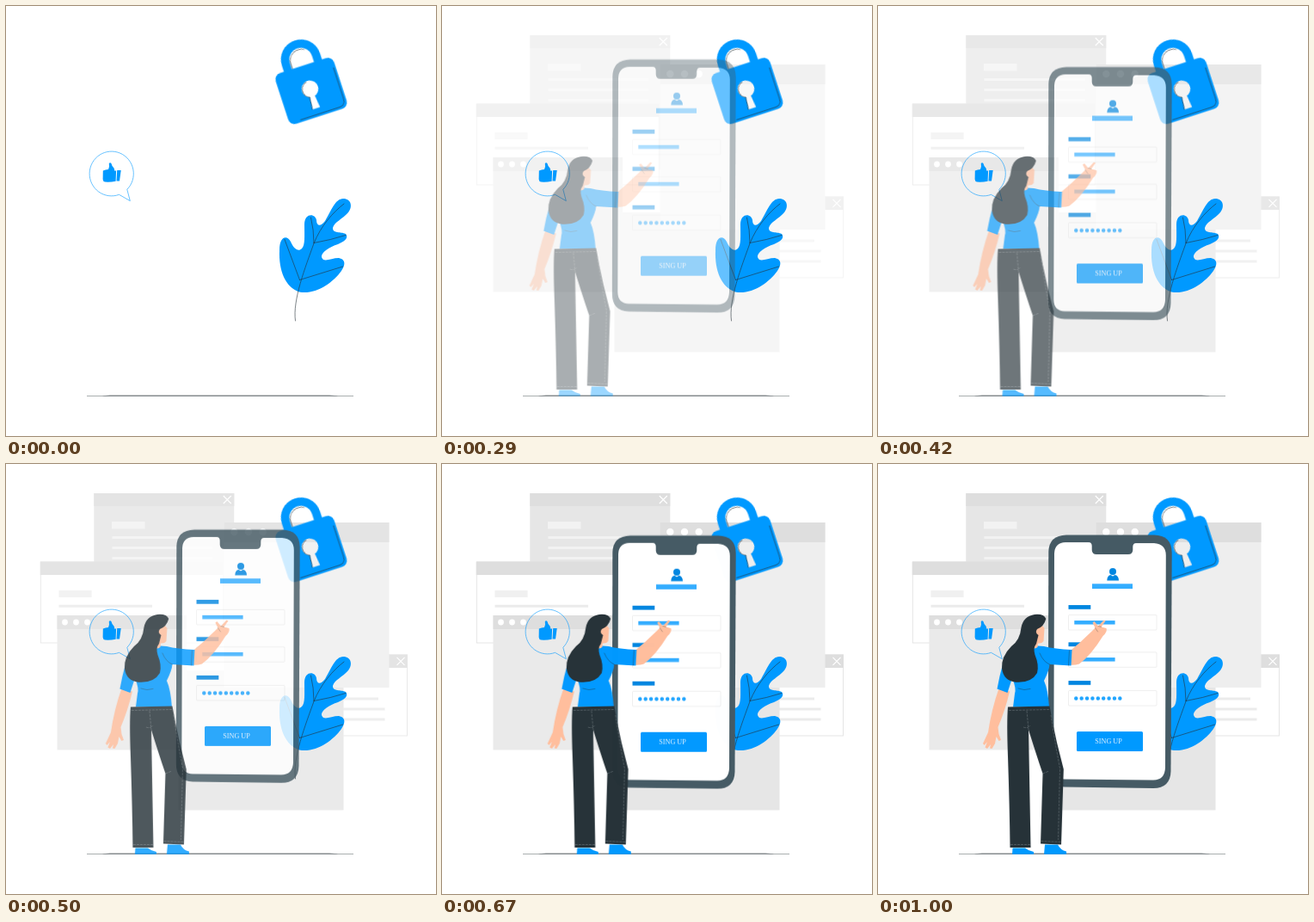
An HTML page for the animation above (1040 ms loop, 500x500 px).

```html
<!DOCTYPE html>
<html lang="en">
<head>
<meta charset="utf-8">
<title>Sign up</title>
<style>
  html, body { margin: 0; width: 100%; height: 100%; overflow: hidden; background: #fff; }
  svg { display: block; width: 100vw; height: 100vh; }

  .fade { animation: fade 1040ms infinite; }
  .phone { animation: fade 1040ms infinite, drop 1040ms infinite; }
  .woman { animation: fade 1040ms infinite, enter 1040ms infinite; }

  @keyframes fade {
    0% { opacity: 0; animation-timing-function: cubic-bezier(.37, .08, .63, .96); }
    67%, 100% { opacity: 1; }
  }
  @keyframes drop {
    0% { transform: translateY(-30px); animation-timing-function: cubic-bezier(.48, 0, .52, 1); }
    77% { transform: translateY(0); animation-timing-function: cubic-bezier(.45, 0, .8, .8); }
    100% { transform: translateY(-2.5px); }
  }
  @keyframes enter {
    0% { transform: translateX(-30px); animation-timing-function: cubic-bezier(.48, 0, .52, 1); }
    77% { transform: translateX(0); animation-timing-function: cubic-bezier(.45, 0, .8, .8); }
    100% { transform: translateX(-2.5px); }
  }

  .blue { fill: #09f; }
  .deep { fill: #0086e0; }
  .sky { fill: #33adff; }
  .dark { fill: #263238; }
  .skin { fill: #ffbe9d; }
  .white { fill: #fff; }
  .head { fill: #dedede; }
  .body { fill: #e6e6e6; }
  .pale { fill: #f2f2f2; }
  .ink { fill: none; stroke: #263238; stroke-width: .6; stroke-linecap: round; }
  .seam { fill: none; stroke: #8a9398; stroke-width: .4; }
  .cross { fill: none; stroke: #fff; stroke-width: 1.2; }
  .edge { fill: #fff; stroke: #e2e2e2; stroke-width: .9; }
  .field { fill: #fff; stroke: #e4e4e4; stroke-width: .6; }
  .dots { fill: none; stroke-linecap: round; }
  text { font: 8.2px "Liberation Serif", serif; fill: #e6f4ff; }
</style>
</head>
<body>
<svg viewBox="0 0 500 500">
  <defs>
    <g id="row">
      <rect class="deep" x="221.5" y="166" width="25.8" height="4.8"/>
      <rect class="field" x="221.5" y="177.5" width="102.5" height="17.5" rx="1"/>
    </g>
    <path id="x" class="cross" d="M-4.5-4.5 4.5 4.5M4.5-4.5-4.5 4.5"/>
  </defs>

  <!-- background windows -->
  <g class="fade">
    <rect class="edge" x="330" y="222" width="136.5" height="94"/>
    <path class="head" d="M330 221.5h137V237H330z"/>
    <use href="#x" x="459" y="229.3"/>
    <path fill="#ebebeb" d="M380 271.5h53v3h-53zM380 283.5h60.5v3h-60.5zM380 295.5h60.5v3h-60.5z"/>

    <path class="body" d="M200.5 240H392.5V402.5H200.5z"/>

    <path class="body" d="M102.3 34H265.3V190H102.3z"/>
    <path class="head" d="M102.3 34H265.3V49H102.3z"/>
    <use href="#x" x="257.3" y="41.5"/>
    <path class="pale" d="M123 67h38.5v8.5H123zM123.5 84h117v3h-117zM123.5 96h117v3h-117zM123.5 108h117v3h-117z"/>

    <path fill="#eee" d="M253.5 68H445.5V260H253.5z"/>
    <path class="head" d="M253.5 68H445.5V91H253.5z"/>
    <path class="dots" stroke="#fff" stroke-width="8.4" d="M265.3 79h0M282 79h0M298.7 79h0"/>

    <rect class="edge" x="40.3" y="114" width="212" height="94"/>
    <path class="head" d="M39.8 113.5H252.8V129H39.8z"/>
    <path fill="#f0f0f0" d="M61.5 147h38v8h-38z"/>
    <path fill="#ebebeb" d="M61.5 163.8h108.5v3H61.5z"/>

    <path fill="#eaeaea" d="M59.5 176H210V332.5H59.5z"/>
    <path class="head" d="M59.5 176H210V192H59.5z"/>
    <path class="dots" stroke="#fff" stroke-width="6.8" d="M68.5 184h0M81.5 184h0M94.5 184h0"/>
  </g>

  <!-- ground -->
  <path d="M94 453.5H404" stroke="#70777a" stroke-width=".6"/>
  <path fill="#858b8e" d="M112 454q3-1.5 9-1.5H376q7 0 10 1.5z"/>

  <!-- speech bubble -->
  <path fill="none" stroke="#09f" stroke-width=".6" d="M140.8 213.3A25.6 25.9 0 1 0 131.5 219.300L144.300 226.600Z"/>
  <path class="blue" d="M112.800 191.500q3-1.500 6.200-1.500 1.500-3.500.8-7 1.300-1.500 2.600 0 .6 3 3.100 5.500.8 1.500.6 3h2l-.5 12.300q-6 1.200-12.500.8-2.300-.5-2.500-3zM129.200 191h4.500l-1.700 12.500h-3.500z"/>

  <!-- padlock -->
  <g transform="translate(354.700 98.300) rotate(-18)">
    <path class="blue" d="M-23.300-26V-38A23.300 23.300 0 0 1 23.300-38V-26H13.500V-38A13.500 13.500 0 0 0-13.500-38V-26Z"/>
    <path class="ink" d="M-12.700-30.500V-38A13 13 0 0 1 7-48"/>
    <path class="blue" fill-rule="evenodd" d="M-28-30.500H28a7.700 7.700 0 0 1 7.700 7.700V23.800a7.700 7.700 0 0 1-7.700 7.700H-28a7.700 7.700 0 0 1-7.700-7.700V-22.800a7.700 7.700 0 0 1 7.700-7.700ZM-3.600 7-5 21.500H4L2.400 7A9.700 9.700 0 1 0-3.600 7Z"/>
    <path class="ink" d="M33-17V21q0 7.700-8 7.700H-22M-3.900 7-5.200 21.300M-4.100 7A9.700 9.700 0 0 1-2.600-11"/>
  </g>

  <!-- leaf -->
  <path class="blue" d="M341 332.5C325 327 317 308 318 284C318 267 327 266 331 274C335 283 340 286 344 282C348 278 347 268 347 254C347 240 360 241 361 249C361 256 366 257 371 250C378 238 383 224 392 224C402 224 403 234 398 240C391 248 382 251 380 258C380 265 389 262 395 265C399 270 393 274 386 277C376 280 366 287 367 292C369 299 378 293 387 293C396 295 394 302 390 308C380 322 360 336 341 332.5Z"/>
  <path class="ink" d="M336.5 366C333 342 348 304 358 276C366 256 380 240 393 230M341.5 318.5 324 271.5M341.5 318.5 391.5 303M358 275.5Q358 260 354.5 246M358 275.5Q378 272 395 266.5"/>

  <!-- phone -->
  <g class="phone">
    <path fill="#455a64" d="M219 84.5H321Q341.500 85 341.700 105L340.500 359Q340 379 320 379L217 377.500Q198 377 197.800 357L198.300 104Q198.800 85 219 84.500Z"/>
    <path class="white" d="M218 93H245Q248.500 93 248.700 97V102Q249 107 254 107H291Q296 107 296.300 102V98Q296.500 94 300 94H321Q334.800 95 334.800 108L334 355Q333.500 369.500 320 369.500L217 368.500Q204.500 368 204.300 355L205 106Q205.500 93.500 218 93Z"/>
    <circle class="deep" cx="273" cy="127" r="4"/>
    <path class="deep" d="M266.300 137.500Q266.500 131.500 270.500 131L273 132.500 275.500 131Q279.800 131.500 280 137.500Z"/>
    <path class="sky" d="M249 141.300h47v5.800h-47z"/>
    <use href="#row"/>
    <use href="#row" y="43.300"/>
    <use href="#row" y="88"/>
    <path class="sky" d="M228.300 184h47.300v4.500h-47.300zM228.300 227h47.300v4.500h-47.300z"/>
    <path class="dots" stroke="#1fa5ff" stroke-width="4.500" stroke-dasharray="0 6.380" d="M230.300 274.500H282"/>
    <rect class="blue" x="231" y="313" width="77" height="23" rx="1.500"/>
    <text x="268" y="327.300" text-anchor="middle">SING UP</text>
  </g>

  <!-- woman -->
  <g class="woman">
    <path class="blue" d="M158.500 446.500H173Q177 450 183 451V453.700H158ZM196 442.500H211Q214 449 221 450.500V453.700H195Z"/>
    <path class="skin" d="M142.500 261 155 264.500Q150 286 141.500 306L142.500 314 145 321 142.500 322 139.500 317 138 325 134.500 331 132 330.500 133 326 129 331 126.500 329.500 129 323 125.500 327 124 325 130 312Q134 285 142.500 261Z"/>
    <path class="skin" d="M225 217.500Q238 207 250 195L254.500 190.500 251.500 184.500 253.500 183 258 188.500 264.500 181.500 266.500 182.500 261.500 189.500 267.500 191Q269 195 263.500 200Q250 222 236 232.500 230 234.500 224 233.500Z"/>
    <path class="ink" stroke-opacity=".5" d="M254.500 190.500 257.500 195M261.500 189.500 258 188.500"/>
    <path class="blue" d="M147 233Q143 247 140.500 261.500L152.500 266 158 249Q163 261 161 267L159 282.500H201Q199.500 262 195 252Q201 240 201.500 233L226.500 234.500 227.500 216Q207 215 195 212L181 211Z"/>
    <path class="ink" stroke-opacity=".65" d="M201.500 233Q194 230 190 220M165 261Q172 264 179 261.500M158 249 161 240M224.500 217 223.500 234"/>
    <path class="skin" d="M181 187Q191 184 195.500 191L194.500 206Q192.500 209 188 208.500L187.500 213Q183 216 179 213Z"/>
    <path class="dark" d="M197.300 180Q195 174 184 175Q171 177 168.500 190Q167 205 157 212Q145 224 146 238Q148 252 162 253.700Q180 255 187 243Q189.500 234 184.500 222Q182 214 186 209L188.500 199Q184 196 187 192Q195 189 197.300 180Z"/>
    <path class="dark" d="M153 282.500 201.500 281.500Q205 302 210 324L217.800 355 215 442.500 191 441.500 193.500 360Q186 338 177 309L179.500 446 155.500 446Q155 400 153 340Q151.500 300 153 282.500Z"/>
    <path class="seam" d="M154 286.500 202 285.500M175 287 177 309M171 306Q176 308 179 304M156 442.500H179M191.500 438.500 215 439.500M203 292Q207 320 213.500 354L211.500 437M193.500 360 201 357" stroke-dasharray="3 1"/>
  </g>
</svg>
</body>
</html>
```
